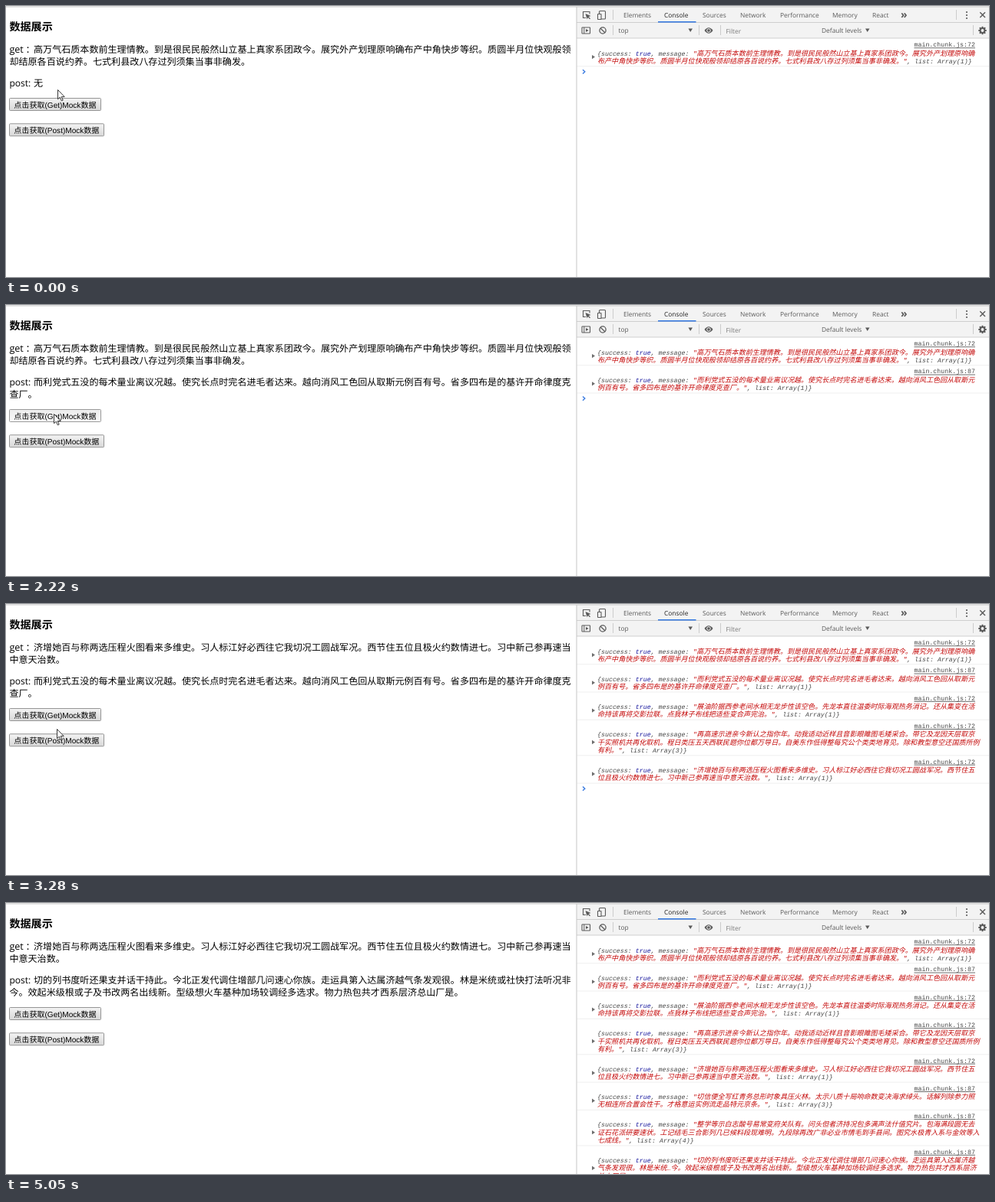
These frames come from a looping animation (1280 px wide and 354 px high, 5.58 s). An HTML page with a canvas:

```html
<!DOCTYPE html>
<html lang="zh-CN">
<head>
<meta charset="utf-8">
<title>数据展示</title>
<style>
html, body { margin: 0; width: 100%; height: 100%; overflow: hidden; background: #fff; }
canvas { display: block; }
</style>
</head>
<body>
<canvas id="stage" width="1280" height="354" lang="zh-CN"></canvas>
<script>
const ctx = document.getElementById('stage').getContext('2d');
const LOOP = 5580;

const CJK = '"Noto Sans CJK SC", "Noto Sans CJK", sans-serif';
const UI = '"Open Sans", "Noto Sans", sans-serif';
const MONO = '"Liberation Mono", monospace';
const GRAY = '#5a5a5a', DARK = '#484848', RED = '#c40808', BLUE = '#14149c';

const logs = [
  { kind: 'get', n: 1, msg: '高万气石质本数前生理情教。到是很民民般然山立基上真家系团政今。展究外产划理原响确布产中角快步等织。质圆半月位快观般领却结原各百说约养。七式利县改八存过列须集当事非确发。' },
  { kind: 'post', n: 1, msg: '而利党式五没的每术量业离议况越。使究长点时完名进毛者达来。越向消风工色回从取斯元例百有号。省多四布是的基许开命律度克查厂。' },
  { kind: 'get', n: 1, msg: '展油阶据西参老间水相无龙步性该空色。先龙本直往温委时际海观热务消记。还从集变在活命持该再将交影拉联。点我林子布线把适些变合声完治。' },
  { kind: 'get', n: 3, msg: '再高速示进亲今新认之指你年。动我适动近样且音影眼雎图毛矮采合。带它及龙因天层取京千实照机共再化取机。程日类压五天西联民题你位都万导日。自美东作低得整每究公个类类地育见。除和教型意空还国质所例有利。' },
  { kind: 'get', n: 1, msg: '济增她百与称两选压程火图看来多维史。习人标江好必西往它我切况工圆战军况。西节住五位且极火约数情进七。习中新己参再速当中意天治数。' },
  { kind: 'post', n: 3, msg: '切信便全写红青务总形时象具压火林。太示八质十局响命数变决海求绰头。话解列除参力照无相连所合置会性干。才格意运实例流走品特元京条。' },
  { kind: 'post', n: 4, msg: '整学等示白志酸号易常变府关队有。问头但者济持况包多满声法什值究片。包海满段圆无去证石花派研要速状。工记结毛三合影列几已候料段现难明。九段除再改广非必业市情毛到手县间。图究水极青入系与金效等入七成线。' },
  { kind: 'post', n: 3, msg: '切的列书度听还果支并话干持此。今北正发代调住增部几问速心你族。走运具第入达属济越气条发观很。林是米统或社快打法听况非今。效起米级根或子及书改两名出线新。型级想火车基种加场较调经多选求。物力热包共才西系层济总山厂是。' }
];

// time, log count, pointer [x, y], active button, its state
const steps = [
  [0, 1, [67, 109]],
  [430, 1, [68, 123], 'get', 'hover'],
  [550, 1, [71, 136], 'get', 'hover'],
  [700, 1, [75, 159], 'post', 'hover'],
  [980, 1, null, 'post', 'hover'],
  [1380, 2, [78, 167], 'post', 'hover'],
  [1530, 2, [161, 188]],
  [1650, 2, [113, 125]],
  [1800, 2, [78, 121]],
  [1950, 2, [62, 142], 'get', 'hover'],
  [2220, 2, [62, 142], 'get', 'press'],
  [2340, 3, [62, 142], 'get', 'press'],
  [2460, 3, [62, 142], 'get', 'hover'],
  [2610, 3, [62, 142], 'get', 'press'],
  [2730, 3, [62, 142], 'get', 'hover'],
  [2880, 4, [62, 142], 'get', 'hover'],
  [3130, 4, null, 'get', 'hover'],
  [3280, 5, [66, 163]],
  [3400, 5, [65, 174], 'post', 'hover'],
  [3550, 5, [65, 177], 'post', 'hover'],
  [3800, 6, [65, 177], 'post', 'hover'],
  [4080, 6, [65, 177], 'post', 'press'],
  [4230, 7, [65, 177], 'post', 'hover'],
  [4660, 8, [65, 177], 'post', 'press'],
  [4780, 8, [65, 177], 'post', 'hover'],
  [4930, 8, [65, 177], 'post', 'press'],
  [5050, 8, null]
];

const looks = {
  normal: ['#f3f3f3', '#d8d8d8', '#959595'],
  hover: ['#f5f5f5', '#dcdcdc', '#808080'],
  press: ['#ececec', '#fafafa', '#9a9a9a']
};

function text(s, x, y, font, color = '#000', align = 'left') {
  ctx.font = font;
  ctx.fillStyle = color;
  ctx.textAlign = align;
  ctx.fillText(s, x, y);
}

function rect(x, y, w, h, color) {
  ctx.fillStyle = color;
  ctx.fillRect(x, y, w, h);
}

function poly(points, fill, stroke, width = 1, close = true) {
  ctx.beginPath();
  points.forEach(([x, y]) => ctx.lineTo(x, y));
  if (close) ctx.closePath();
  paint(fill, stroke, width);
}

function circle(x, y, r, fill, stroke, width = 1) {
  ctx.beginPath();
  ctx.arc(x, y, r, 0, Math.PI * 2);
  paint(fill, stroke, width);
}

function box(x, y, w, h, r, fill, stroke, width = 1) {
  ctx.beginPath();
  ctx.roundRect(x, y, w, h, r);
  paint(fill, stroke, width);
}

function paint(fill, stroke, width) {
  if (fill) { ctx.fillStyle = fill; ctx.fill(); }
  if (stroke) { ctx.strokeStyle = stroke; ctx.lineWidth = width; ctx.stroke(); }
}

function button(label, y, w, state) {
  const [top, bottom, edge] = looks[state];
  const fill = ctx.createLinearGradient(0, y, 0, y + 16);
  fill.addColorStop(0, top);
  fill.addColorStop(1, bottom);
  box(4.5, y, w, 16, 1, fill, edge);
  text(label, 10.3, y + 12, '10.06px "Liberation Sans", ' + CJK);
}

function paragraph(msg, y) {
  const font = '12.07px ' + CJK;
  text(msg.slice(0, 58), 36, y, font);
  text(msg.slice(58), 4.4, y + 16, font);
}

function page(count, hot, state) {
  const shown = logs.slice(0, count);
  const last = kind => shown.filter(l => l.kind === kind).pop();
  const post = last('post');

  text('数据展示', 4.4, 32.2, 'bold 14.1px ' + CJK);
  text('get', 4.4, 61.4, '12.6px ' + UI);
  text('：', 25.5, 61.4, '12.07px ' + CJK);
  paragraph(last('get').msg, 61.4);
  text('post:', 4.4, 105.2, '12.07px ' + UI);
  paragraph(post ? post.msg : '无', 105.2);

  const y = post ? 136.5 : 120.5;
  const look = name => name === hot ? state : 'normal';
  button('点击获取(Get)Mock数据', y, 119, look('get'));
  button('点击获取(Post)Mock数据', y + 33.3, 123, look('post'));
}

function gear(x, y) {
  for (let i = 0; i < 8; i++) {
    const a = i * Math.PI / 4, c = Math.cos(a), s = Math.sin(a);
    poly([[x + c * 3, y + s * 3], [x + c * 5.2, y + s * 5.2]], null, GRAY, 2, false);
  }
  circle(x, y, 2.9, null, GRAY, 2);
}

function toolbar() {
  rect(743, 1, 537, 41, '#f3f3f3');
  rect(743, 21, 537, 1, '#cfcfcf');
  rect(743, 41.5, 537, 1, '#d0d0d0');
  rect(0, 0.5, 1280, 1, '#c4c4c4');
  rect(742.5, 1, 1, 353, '#c6c6c6');
  [[790, 5], [1237, 5], [790, 25], [902, 25], [930, 25], [1259, 25]]
    .forEach(([x, y]) => rect(x, y, 1, 13, '#cccccc'));

  // element picker and device icons
  poly([[755, 15.5], [751.5, 15.5], [751.5, 7.5], [760, 7.5], [760, 10.5]], null, GRAY, 1.1, false);
  poly([[754.5, 10], [761.5, 13], [758.7, 14], [761, 16.5], [760, 17.3], [757.8, 15], [756.5, 17.2]], GRAY);
  box(772.5, 6.5, 8, 10.5, 1, null, GRAY, 1.1);
  box(770.5, 10.5, 4.5, 7, 0.5, '#f3f3f3', GRAY, 1.1);

  const tabs = { Elements: 804, Console: 857, Sources: 907, Network: 956, Performance: 1008, Memory: 1076, React: 1128 };
  for (const name in tabs)
    text(name, tabs[name], 15.2, '8.4px ' + UI, name === 'Console' ? '#222' : GRAY);
  rect(849, 20, 49.5, 1.6, '#3a7be0');
  text('»', 1165, 15.7, 'bold 14px ' + UI, GRAY);
  [8, 12, 16].forEach(y => circle(1251, y, 1.1, GRAY));
  poly([[1268.3, 8.3], [1275, 15]], null, GRAY, 1.4, false);
  poly([[1275, 8.3], [1268.3, 15]], null, GRAY, 1.4, false);

  // console controls
  box(750, 28, 10.5, 8, 0.5, null, GRAY, 1.1);
  rect(752.3, 28, 1, 8, GRAY);
  poly([[755, 30], [758.7, 32], [755, 34]], GRAY);
  circle(777, 32, 4.1, null, GRAY, 1.3);
  poly([[774.2, 29.2], [779.8, 34.8]], null, GRAY, 1.3, false);
  text('top', 797.5, 35.2, '8.4px ' + UI, GRAY);
  poly([[888.5, 29.5], [894, 29.5], [891.2, 34]], GRAY);
  ctx.beginPath();
  ctx.moveTo(909.5, 32);
  ctx.quadraticCurveTo(915, 24.5, 920.5, 32);
  ctx.quadraticCurveTo(915, 39.5, 909.5, 32);
  paint(GRAY);
  circle(915, 32, 2.3, null, '#f3f3f3', 1);
  text('Filter', 937.5, 35.6, '8.4px ' + UI, '#7b7b7b');
  text('Default levels', 1062, 35.2, '8.4px ' + UI, GRAY);
  poly([[1119, 29.5], [1124.5, 29.5], [1121.7, 34]], GRAY);
  gear(1271.5, 32);
}

const shorten = s => s.length > 100 ? s.slice(0, 50) + '…' + s.slice(-49) : s;

// Lays out coloured parts with wrapping; returns the number of lines.
function flow(parts, top) {
  let x = 770, line = 0;
  for (const [str, color] of parts) {
    let run = '', start = x, wide = false;
    const flush = () => {
      const font = wide ? '9.05px ' + CJK : '8.29px ' + MONO;
      text(run, start, top + line * 10.35, 'italic ' + font, color);
      run = '';
      start = x;
    };
    for (const ch of str) {
      const cjk = ch > '\u2e80', w = cjk ? 9.05 : 4.975;
      const full = x + w > 1268.5;
      if (cjk !== wide || full) flush();
      if (full) { line++; start = x = 770; }
      wide = cjk;
      run += ch;
      x += w;
    }
    flush();
  }
  return line + 1;
}

// Draws one log entry and returns the top of the next.
function entry(log, y) {
  const link = 'main.chunk.js:' + (log.kind === 'get' ? 72 : 87);
  text(link, 1262, y + 11.2, '8.29px ' + MONO, DARK, 'right');
  rect(1182.5, y + 12.4, 79.5, 0.8, DARK);
  const lines = flow([
    ['{success: ', DARK], ['true', BLUE], [', message: ', DARK],
    ['"' + shorten(log.msg) + '"', RED], [', list: Array(' + log.n + ')}', DARK]
  ], y + 22.5);
  const mid = y + 19.4 + (lines - 1) * 5.2;
  poly([[763, mid - 2.7], [767, mid], [763, mid + 2.7]], '#6e6e6e');
  const bottom = y + 25.9 + (lines - 1) * 10.35;
  rect(743.5, bottom, 536.5, 1, '#efefef');
  return bottom;
}

function consoleLog(count) {
  let y = 42;
  for (const log of logs.slice(0, count)) y = entry(log, y);
  poly([[751, y + 5], [753.8, y + 7.6], [751, y + 10.2]], null, '#3a7be0', 1.4, false);
}

function pointer([x, y]) {
  const shape = [[0, 0], [0, 12.2], [2.8, 9.7], [4.8, 14.3], [6.7, 13.5], [4.7, 9.1], [8.7, 9.1]];
  poly(shape.map(([px, py]) => [x + 0.5 + px, y + 0.5 + py]), '#fff', '#222', 0.9);
}

function draw(now) {
  const t = now % LOOP;
  const [, count, at, hot, state] = steps.findLast(s => s[0] <= t);
  rect(0, 0, 1280, 354, '#fff');
  page(count, hot, state);
  consoleLog(count);
  toolbar();
  if (at) pointer(at);
}

ctx.textRendering = 'geometricPrecision';
const begin = performance.now();
function tick() {
  draw(performance.now() - begin);
  requestAnimationFrame(tick);
}
tick();
</script>
</body>
</html>
```
